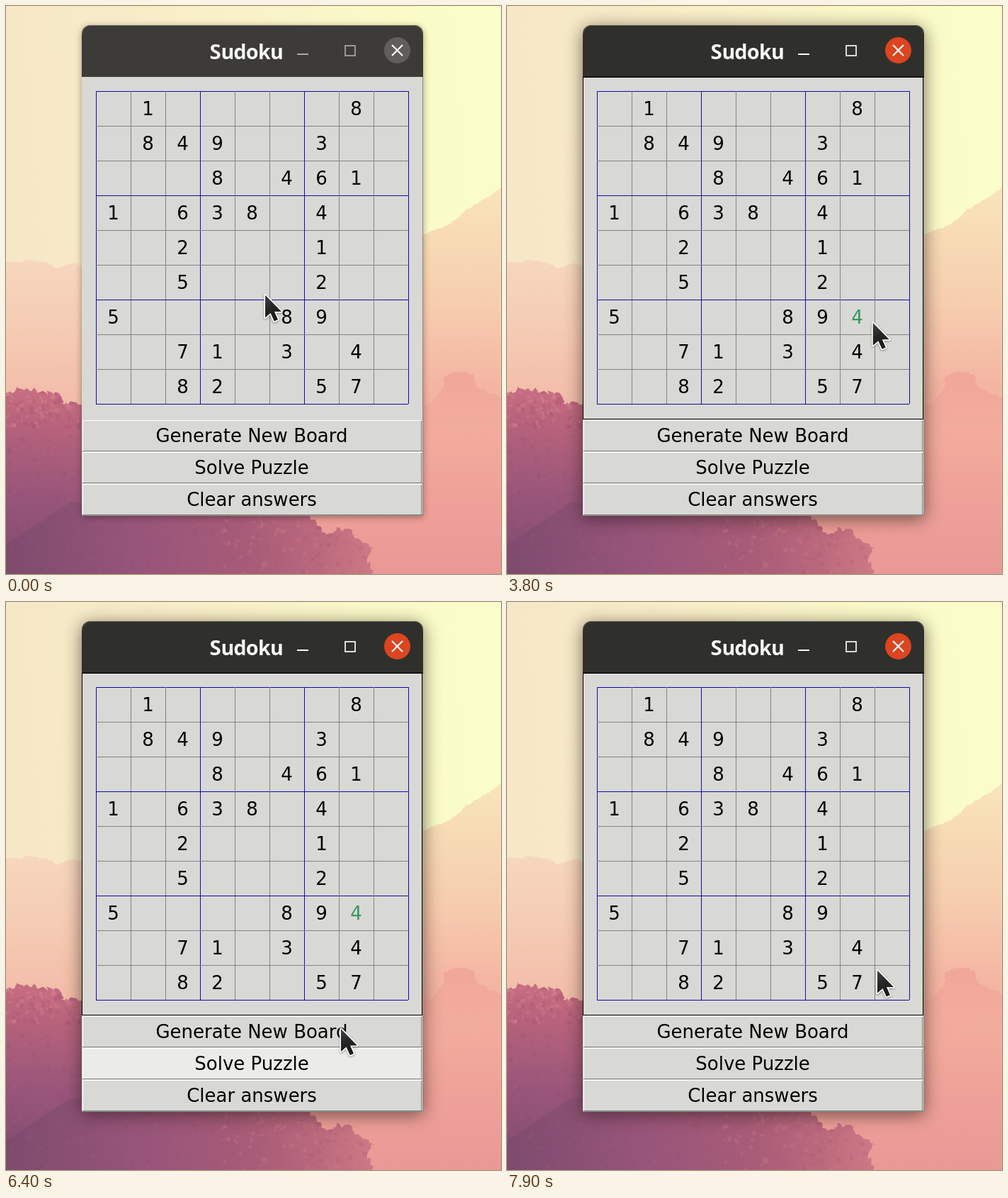
These frames come from a looping animation (699x801 px, 8000 ms). An HTML page with a canvas:

```html
<!DOCTYPE html>
<html lang="en">
<head>
<meta charset="utf-8">
<title>Sudoku</title>
<style>
  html, body { margin: 0; width: 100%; height: 100%; overflow: hidden; }
  canvas { display: block; }
</style>
</head>
<body>
<canvas id="stage" width="699" height="801"></canvas>
<script>
const W = 699, H = 801, LOOP = 8000, TICK = 100;
const FOCUS_AT = 2000, TYPED_AT = 3700, CLEARED_AT = 7000;
const CELL = 49, LEFT = 127, TOP = 120;
const FACE = '#d8d9d4', LIT = '#ebece7', GREEN = '#3a955f';
const FONT = '26px "DejaVu Sans", sans-serif';
const ROWS = [
  '.1.....8.', '.849..3..', '...8.461.',
  '1.638.4..', '..2...1..', '..5...2..',
  '5....89..', '..71.3.4.', '..82..57.'
];
const BUTTONS = ['Generate New Board', 'Solve Puzzle', 'Clear answers'];

// Pointer moves: start time, number of ticks, end point, optional bend point
const START = [366, 407.5];
const MOVES = [
  { t: 200, n: 1, to: [367, 408] },
  { t: 400, n: 5, to: [416, 438.5] },
  { t: 1000, n: 4, to: [442, 487] },
  { t: 1500, n: 4, to: [493, 438.5], bend: [531, 465] },
  { t: 2500, n: 1, to: [498, 444] },
  { t: 3700, n: 4, to: [535.5, 449.5] },
  { t: 5000, n: 5, to: [555, 485], bend: [553.4, 471.6] },
  { t: 5600, n: 4, to: [495, 441] },
  { t: 6100, n: 4, to: [473, 602] },
  { t: 6500, n: 5, to: [449, 700], bend: [454, 685] },
  { t: 7300, n: 4, to: [522.5, 518] },
  { t: 7900, n: 1, to: [523, 519.5] }
];

const ctx = document.getElementById('stage').getContext('2d');
const backdrop = paintBackdrop();

function makeRandom(seed) {
  return () => {
    seed = (seed * 1664525 + 1013904223) >>> 0;
    return seed / 4294967296;
  };
}

function gradient(c, x0, y0, x1, y1, ...stops) {
  const g = c.createLinearGradient(x0, y0, x1, y1);
  stops.forEach(([at, color]) => g.addColorStop(at, color));
  return g;
}

// Outline through the given points, roughened like foliage
function ridge(points, rough, random, close) {
  const path = new Path2D();
  path.moveTo(...points[0]);
  for (let i = 1; i < points.length; i++) {
    const [ax, ay] = points[i - 1], [bx, by] = points[i];
    const n = Math.max(1, Math.round(Math.hypot(bx - ax, by - ay) / 3));
    for (let k = 1; k <= n; k++) {
      const jitter = () => (random() - 0.5) * rough;
      path.lineTo(ax + (bx - ax) * k / n + jitter(), ay + (by - ay) * k / n + jitter());
    }
  }
  close.forEach(p => path.lineTo(...p));
  path.closePath();
  return path;
}

function speckle(c, random, count, box, colors, alpha) {
  const [x, y, w, h] = box;
  c.globalAlpha = alpha;
  for (let i = 0; i < count; i++) {
    c.fillStyle = colors[i % colors.length];
    c.beginPath();
    c.ellipse(x + random() * w, y + random() * h, 1 + random() * 4, 1 + random() * 2.5, random() * 3, 0, 7);
    c.fill();
  }
  c.globalAlpha = 1;
}

function paintBackdrop() {
  const layer = document.createElement('canvas');
  layer.width = W;
  layer.height = H;
  const c = layer.getContext('2d');
  const random = makeRandom(41);

  c.fillStyle = gradient(c, 0, 60, W, 0,
    [0, '#f6e7c7'], [0.4, '#f9efc8'], [0.82, '#fafbc8'], [1, '#fafdca']);
  c.fillRect(0, 0, W, H);

  c.fillStyle = gradient(c, 0, 260, 0, H,
    [0, '#f8e4ba'], [0.3, '#f6cdae'], [0.5, '#f4b6a3'], [0.75, '#f0a499'], [1, '#ea9896']);
  c.fill(ridge([[560, 335], [600, 318], [628, 307], [650, 287], [680, 270], [699, 255]],
    2.5, random, [[W, H], [300, H], [300, 335]]));

  c.fillStyle = gradient(c, 0, 510, 0, 620, [0, '#f1a697'], [1, 'rgba(239,160,150,0)']);
  c.fill(ridge([[589, 568], [615, 545], [620, 521], [640, 515], [660, 520], [668, 540], [699, 552]],
    4, random, [[W, 640], [589, 640]]));

  c.fillStyle = gradient(c, 0, 355, 0, 560, [0, '#f6d7bd'], [0.5, '#f5cbb4'], [1, '#f2bca9']);
  c.fill(ridge([[0, 362], [18, 361], [34, 358], [58, 363], [74, 369], [92, 363], [125, 367]],
    3, random, [[125, H], [0, H]]));

  const near = ridge([[0, 548], [18, 538], [36, 541], [60, 546], [76, 550], [82, 564], [98, 557], [130, 565]],
    8, random, [[130, H], [0, H]]);
  c.fillStyle = gradient(c, 40, 535, 10, H,
    [0, '#c96f82'], [0.22, '#b6627b'], [0.55, '#9a567a'], [1, '#7d4b6d']);
  c.fill(near);
  c.save();
  c.clip(near);
  speckle(c, random, 130, [0, 535, 110, 60], ['#d68b91', '#a95474'], 0.3);
  speckle(c, random, 150, [0, 590, 110, 211], ['#b3667f', '#824a6d'], 0.14);
  c.restore();

  const front = ridge([[400, 700], [428, 718], [440, 731], [450, 744], [470, 737], [486, 741], [500, 755], [520, 764], [511, 780], [520, 801]],
    7, random, [[0, H], [0, 760], [90, 700]]);
  c.fillStyle = gradient(c, 0, H, 520, 735,
    [0, '#7d4b6d'], [0.35, '#96547a'], [0.65, '#a75b77'], [0.85, '#bb697d'], [1, '#cf7b86']);
  c.fill(front);
  c.save();
  c.clip(front);
  speckle(c, random, 150, [300, 715, 225, 86], ['#d28288', '#a25873'], 0.24);
  speckle(c, random, 110, [0, 718, 320, 83], ['#ad637e', '#834b70'], 0.13);
  c.restore();
  return layer;
}

function rect(color, x, y, w, h) {
  ctx.fillStyle = color;
  ctx.fillRect(x, y, w, h);
}

function frame(color, x, y, w, h, width = 1) {
  ctx.strokeStyle = color;
  ctx.lineWidth = width;
  ctx.strokeRect(x, y, w, h);
}

function label(text, x, y, color, font = FONT) {
  ctx.font = font;
  ctx.textAlign = 'center';
  ctx.fillStyle = color;
  ctx.fillText(text, x, y);
}

function drawWindow(focused) {
  ctx.save();
  ctx.shadowColor = focused ? 'rgba(40,25,20,.62)' : 'rgba(40,25,20,.42)';
  ctx.shadowBlur = focused ? 24 : 10;
  ctx.shadowOffsetY = focused ? 4 : 2;
  ctx.fillStyle = focused ? '#2f302b' : '#3c3b37';
  ctx.beginPath();
  ctx.roundRect(107, 27, 482, 692, [12, 12, 0, 0]);
  ctx.fill();
  ctx.restore();

  ctx.strokeStyle = focused ? '#5a5a50' : '#67665c';
  ctx.lineWidth = 1;
  ctx.beginPath();
  ctx.moveTo(107.5, 40);
  ctx.arcTo(107.5, 27.5, 120, 27.5, 12);
  ctx.arcTo(588.5, 27.5, 588.5, 40, 12);
  ctx.stroke();

  rect(FACE, 107, 100, 481, 618);
  rect('#8d8e89', 588, 100, 1, 619);
  rect('#8d8e89', 107, 718, 482, 1);
  if (focused) {
    rect('#201a20', 107, 99, 482, 2);
    frame('#050505', 107.5, 100.5, 480, 482);
  }

  label('Sudoku', 339, 75, '#fefef9', 'bold 29px "Noto Sans Mono", monospace');
  const icon = focused ? '#fafaf5' : '#aaa9a5';
  rect(icon, 411, 67, 16, 2);
  frame(icon, 479, 56, 14, 14, 1.7);
  ctx.fillStyle = focused ? '#dc451f' : '#5f5e5c';
  ctx.beginPath();
  ctx.arc(552.5, 62.5, 18.5, 0, 7);
  ctx.fill();
  ctx.strokeStyle = '#fff';
  ctx.lineWidth = 2.2;
  ctx.beginPath();
  ctx.moveTo(545, 55);
  ctx.lineTo(560, 70);
  ctx.moveTo(560, 55);
  ctx.lineTo(545, 70);
  ctx.stroke();
}

function drawBoard(selected, typed) {
  for (let i = 0; i < 10; i++) {
    const color = i % 3 ? '#838480' : '#130ba5';
    rect(color, LEFT + i * CELL, TOP, 1, 9 * CELL);
    rect(color, LEFT, TOP + i * CELL, 9 * CELL, 1);
  }
  const digit = (value, row, col, color) =>
    label(value, LEFT + (col + 0.5) * CELL, TOP + row * CELL + 34, color);
  ROWS.forEach((line, row) => [...line].forEach((value, col) => {
    if (value !== '.') digit(value, row, col, '#000');
  }));
  if (typed) digit('4', 6, 7, GREEN);
  if (selected) {
    ctx.setLineDash([2, 1]);
    frame('#20824d', 471.5, 415.5, 48, 48);
    ctx.setLineDash([]);
  }
}

const buttonTop = i => 584 + 45 * i;

function drawButtons(hovered) {
  BUTTONS.forEach((text, i) => {
    const y = buttonTop(i);
    rect(i === hovered ? LIT : FACE, 108, y, 480, 44);
    rect('#fff', 108, y, 479, 1);
    rect('#fff', 108, y, 1, 43);
    rect('#838480', 108, y + 43, 480, 1);
    rect('#838480', 586, y + 1, 1, 43);
    label(text, 347, y + 31, '#000');
  });
}

function pointerAt(time) {
  let from = START;
  for (const { t, n, to, bend } of MOVES) {
    if (time < t) break;
    const p = Math.min(1, (Math.floor((time - t) / TICK) + 1) / n), q = 1 - p;
    const start = from;
    from = start.map((a, i) => {
      const mid = bend ? bend[i] : (a + to[i]) / 2;
      return q * q * a + 2 * p * q * mid + p * p * to[i];
    });
  }
  return from;
}

// While the pointer moves, the highlight runs one tick ahead of it
function hoveredButton(time) {
  const moving = pointerAt(time)[1] !== pointerAt(time - TICK)[1];
  const y = pointerAt(moving ? time + TICK : time)[1];
  return BUTTONS.findIndex((_, i) => y >= buttonTop(i) && y < buttonTop(i) + 44);
}

function drawPointer([x, y]) {
  ctx.save();
  ctx.translate(x, y);
  const arrow = new Path2D('M0 0V32L7.5 25.5L12.8 37L18 34.7L13 23.5H23Z');
  ctx.lineJoin = 'round';
  ctx.lineWidth = 3.4;
  ctx.strokeStyle = '#fff';
  ctx.shadowColor = 'rgba(0,0,0,.4)';
  ctx.shadowBlur = 3;
  ctx.shadowOffsetY = 1;
  ctx.stroke(arrow);
  ctx.shadowColor = 'transparent';
  ctx.fillStyle = gradient(ctx, 0, 0, 12, 36, [0, '#444'], [0.5, '#262626'], [1, '#181818']);
  ctx.fill(arrow);
  ctx.restore();
}

function draw(time) {
  ctx.drawImage(backdrop, 0, 0);
  drawWindow(time >= FOCUS_AT);
  drawBoard(time >= FOCUS_AT && time < TYPED_AT, time >= TYPED_AT && time < CLEARED_AT);
  drawButtons(hoveredButton(time));
  drawPointer(pointerAt(time));
}

const began = performance.now();
function loop() {
  const time = (performance.now() - began) % LOOP;
  draw(Math.floor(time / TICK) * TICK);
  requestAnimationFrame(loop);
}
loop();
</script>
</body>
</html>
```
